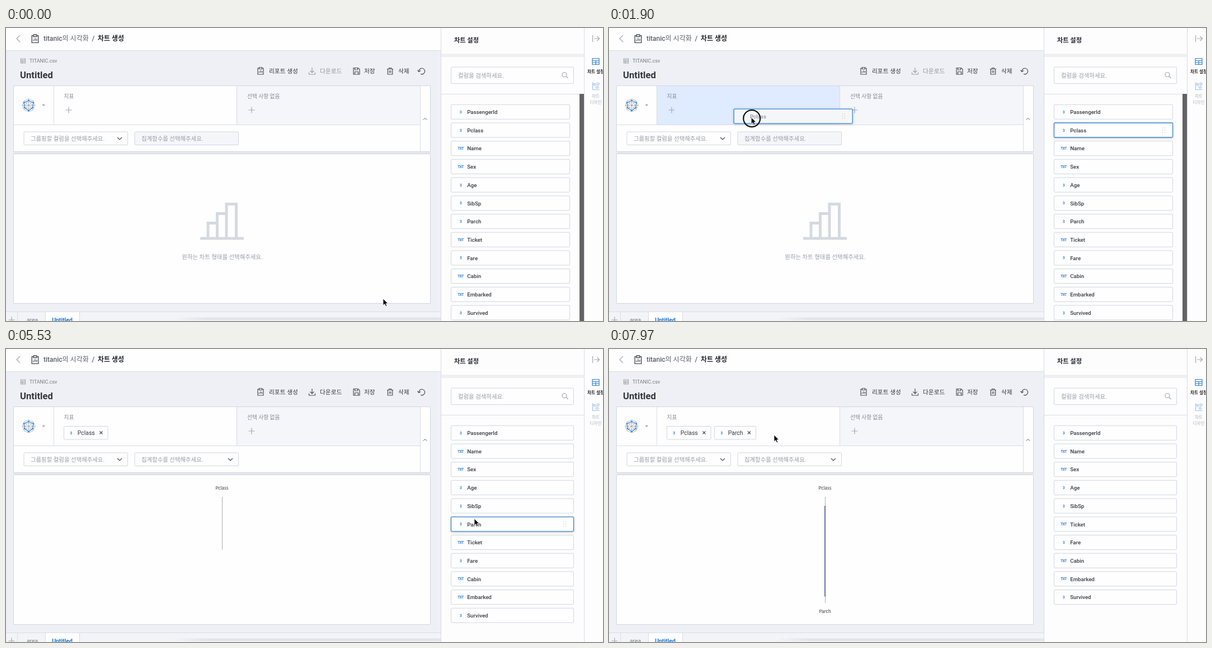
These frames come from a looping animation (1067 by 525 pixels, 8 s). An HTML page:

```html
<!DOCTYPE html>
<html lang="ko">
<head>
<meta charset="utf-8">
<title>차트 생성</title>
<style>
html, body { margin: 0; width: 100%; height: 100%; overflow: hidden; background: #fdfdfe; }
svg { display: block; width: 1067px; height: 525px; font: 10.4px Roboto, 'Noto Sans CJK KR', sans-serif; fill: #999da5; }
.line { fill: none; stroke: #d9dce3; }
.icon { fill: none; stroke: #4a4e57; stroke-width: 1.2; }
.muted { stroke: #a3a7af; }
.blue { stroke: #2f7fd0; }
.box { fill: #fefeff; stroke: #d2d6de; }
.off { fill: #f4f6fa; }
.bold { font-weight: 700; fill: #24272d; }
.tool { font-size: 10.7px; font-weight: 500; fill: #33363d; }
.head { font-size: 9.7px; font-weight: 500; fill: #858a93; }
.name { font-size: 9.7px; font-weight: 500; fill: #383b42; }
.type { font-size: 6.4px; font-weight: 700; fill: #2f7fd0; text-anchor: middle; letter-spacing: -.5px; }
.active { stroke: #3a86d0; stroke-width: 1.3; filter: drop-shadow(0 1px 2px #0003); }
.mid { text-anchor: middle; }
.tiny { font-size: 7.6px; text-anchor: middle; }
.axis { font: 8px 'Noto Sans CJK KR', sans-serif; text-anchor: middle; fill: #333; }
</style>
</head>
<body>
<svg viewBox="0 0 1067 525">
  <defs>
    <linearGradient id="fade">
      <stop offset="0" stop-color="#d8dae0" stop-opacity="0"/>
      <stop offset=".12" stop-color="#d8dae0" stop-opacity=".6"/>
      <stop offset="1" stop-color="#d8dae0" stop-opacity=".6"/>
    </linearGradient>
    <g id="clip" class="icon">
      <path d="M-2.5-5H-5V6H5V-5H2.5M-2.5-6.5h5v3h-5zM-2.5 3V1M0 3V-1M2.5 3V0"/>
    </g>
    <path id="cursor" d="M0 0V12L2.8 9.5 4.8 13.6 6.8 12.7 4.9 8.7H8.6Z" fill="#000" stroke="#fff" stroke-width=".8"/>
    <path id="plus" class="icon muted" d="M-5.5 0h11M0-5.5v11"/>
    <path id="chevron" class="icon" d="M-4-2 0 2 4-2"/>
  </defs>

  <path fill="#eef0f5" d="M0 40h777v485H0z"/>
  <path fill="#fefeff" d="M0 0h777v40H0z"/>
  <path class="line" d="M0 40.5h777"/>

  <path class="icon muted" d="M25 13l-6 6 6 6"/>
  <use href="#clip" transform="translate(52 19.5) scale(1.15)"/>
  <g font-size="12" font-weight="500" fill="#5b606a">
    <text x="67" y="23">titanic의 시각화</text>
    <text x="153.500" y="23">/</text>
  </g>
  <text class="bold" font-size="12" x="164" y="23">차트 생성</text>

  <path class="icon muted" stroke-width="1" d="M26.500 55h8v8h-8zM26.500 57.500h8M26.500 60.300h8M29.500 57.500V63"/>
  <text x="42" y="62" font-size="9" fill="#777c85">TITANIC.csv</text>
  <text class="bold" x="25" y="89.500" font-size="16.700" style="fill:#33363d">Untitled</text>

  <use href="#clip" x="455" y="77"/>
  <text class="tool" x="470" y="81">리포트 생성</text>
  <path class="icon" d="M621 71.500h8.500l2.500 2.500v9h-11zM623.500 71.500v3.500h5v-3.500M623.500 83v-4.500h6V83"/>
  <text class="tool" x="640" y="81">저장</text>
  <path class="icon" d="M681 73.500h11M684.500 73.500v-2h4v2M682.300 73.500V83h8.400v-9.500M685.300 76v4.500M687.700 76v4.500"/>
  <text class="tool" x="701" y="81">삭제</text>
  <path class="icon" d="M738 78a5.300 5.300 0 1 1 3 4.300M735.500 75.500l2.500 3 3-2.300"/>

  <path class="box" d="M13.500 103.500h745v118h-745z"/>
  <path class="off" d="M412 104h328v70H412z"/>
  <g id="panel"></g>
  <path class="line" d="M85.500 104v70M412.500 104v70M740.500 104v118M14 173.500h726"/>
  <path fill="#e6e8ed" d="M14 222h744v3H14z"/>
  <path class="box" d="M13.500 225.500h745v268h-745z"/>

  <g id="radar"></g>
  <path d="M64.500 137h5.500l-2.750 3z"/>
  <text class="head" x="103.500" y="125.500">지표</text>
  <text class="head" x="431" y="125.500">선택 사항 없음</text>
  <use href="#plus" x="439" y="147"/>
  <use href="#chevron" class="flip" transform="translate(749 163) scale(.8 -.8)"/>
  <rect class="box" x="32" y="186" width="185.500" height="23.500" rx="1.500"/>
  <text x="44" y="201.500">그룹핑할 컬럼을 선택해주세요.</text>
  <use href="#chevron" x="203" y="198"/>

  <path class="line" d="M0 508.500h777"/>
  <path fill="#f3f4f8" d="M0 509h777v16H0z"/>
  <path fill="url(#fade)" d="M300 518.500h477v5H300z"/>
  <path fill="#fefeff" d="M71 509h60v16H71z"/>
  <path class="line" d="M20.500 509v16M70.500 509v16M131.500 509v16"/>
  <use href="#plus" x="10" y="523"/>
  <text class="mid" x="47" y="526.500" fill="#777c85">area</text>
  <text class="bold mid" x="100.500" y="526.500" style="fill:#1f78d1">Untitled</text>

  <path fill="#fdfdfe" d="M777 0h290v525H777z"/>
  <path fill="#f0f0f3" d="M778 46h255v6H778z"/>
  <path class="line" d="M777.500 0v525M1033.500 0v525M778 118.500h255"/>
  <text class="bold" x="801" y="26" font-size="11.200">차트 설정</text>
  <rect class="box" x="795.500" y="70" width="219" height="29.500" rx="1.500"/>
  <text x="808" y="88.500">컬럼을 검색하세요.</text>
  <path class="icon muted" d="M1002 83.500a4 4 0 1 1-8 0 4 4 0 0 1 8 0M1001 86.500l3.500 3.500"/>
  <path class="icon muted" d="M1048.500 13v12M1051 19h9M1056.500 15l4 4-4 4"/>
  <path class="icon blue" d="M1048 54.500h12v11h-12zM1048 58.500h12M1048 62h12M1054 58.500v7"/>
  <text class="bold tiny" x="1054" y="81">차트 설정</text>
  <path class="icon blue" opacity=".45" d="M1048.500 97v13.500h12M1053.500 101a1.700 1.700 0 1 1-3.400 0 1.700 1.700 0 0 1 3.400 0M1060 100a2 2 0 1 1-4 0 2 2 0 0 1 4 0M1058.500 106a2 2 0 1 1-4 0 2 2 0 0 1 4 0"/>
  <text class="tiny" x="1054" y="125" fill="#b0b4bb">차트</text>
  <text class="tiny" x="1054" y="136" fill="#b0b4bb">디자인</text>

  <g id="scene"></g>
</svg>
<script>
const LOOP = 8000, ROW = 32.7, LIST_X = 795.5, LIST_Y = 137.3, CARD_H = 26;
const columns = ['PassengerId', 'Pclass', 'Name', 'Sex', 'Age', 'SibSp', 'Parch', 'Ticket', 'Fare', 'Cabin', 'Embarked', 'Survived'];
const textual = ['Name', 'Sex', 'Ticket', 'Cabin', 'Embarked'];
const drags = [
  { name: 'Pclass', press: 840, drop: 2530, grab: [31, 15] },
  { name: 'Parch', press: 5660, drop: 7130, grab: [31, 8] }
];
// time, x, y of the pointer tip
const path = [
  [0, 674, 485], [30, 674, 485], [780, 826, 185], [880, 826, 185], [1430, 314, 165],
  [2500, 168, 153], [2700, 164, 154], [2900, 164, 154], [3700, 806, 400], [4230, 828, 410],
  [4630, 828, 410], [5430, 838, 302], [5530, 837, 304], [5640, 826, 309], [5700, 826, 309],
  [6230, 317, 156], [7070, 297, 155], [7970, 295, 154], [LOOP, 295, 154]
];
const $ = id => document.getElementById(id);

function pointerAt(t) {
  const i = path.findIndex(p => p[0] > t);
  const [t0, x0, y0] = path[i - 1], [t1, x1, y1] = path[i];
  const u = (t - t0) / (t1 - t0), k = u * u * (3 - 2 * u);
  return [x0 + (x1 - x0) * k, y0 + (y1 - y0) * k];
}

const inside = ([px, py], x, y, w, h) => px >= x && px <= x + w && py >= y && py <= y + h;

function card(name, x, y, w, active, ghost) {
  let dots = '';
  if (active) for (let i = 0; i < 6; i++)
    dots += `<circle cx="${x + w - 18 + i % 2 * 4}" cy="${y + 9 + (i >> 1) * 4}" r=".8" fill="#c3c7cf"/>`;
  return `<rect class="box ${active ? 'active' : ''}" x="${x}" y="${y}" width="${w}" height="${CARD_H}" rx="1.5" ${ghost ? 'fill-opacity=".85"' : ''}/>
    <g opacity="${ghost ? .55 : 1}">
      <text class="type" x="${x + 17}" y="${y + 15.5}">${textual.includes(name) ? 'TXT' : '3'}</text>
      <text class="name" x="${x + 28.7}" y="${y + 16.7}">${name}</text>
    </g>${dots}`;
}

function chip(name, x, w, hover) {
  const c = x + w - 12;
  return `<rect class="box" x="${x}" y="138.500" width="${w}" height="23.500" rx="1.500" ${hover ? 'style="fill:#ececf1"' : ''}/>
    <text class="type" x="${x + 12.5}" y="152.500">3</text>
    <text x="${x + 24.3}" y="154" fill="#33363d">${name}</text>
    <path class="icon" d="M${c - 2.5} 147.500l5 5m0-5l-5 5"/>`;
}

function chart(t, count) {
  if (!count) return `<path fill="none" stroke="#d5d9e0" stroke-width="5"
      d="M347 377h78M361 376v-26.500h16.500M377.500 376v-43.500h16.500M394 376v-60.500h17.500v60.500"/>
    <text class="mid" x="386.500" y="414">원하는 차트 형태를 선택해주세요.</text>`;
  let out = `<path d="M386.500 265V${count > 1 ? 455 : 360}" stroke="#a9abb0"/><text class="axis" x="386" y="251.500">Pclass</text>`;
  if (count > 1) {
    const grow = 1 - (1 - Math.min(1, (t - drags[1].drop) / 800)) ** 3;
    out += `<path d="M386 ${360 - 79 * grow}V${360 + 83.5 * grow}" stroke="#4a508f" stroke-width="1.500"/>
      <text class="axis" x="386" y="472.500">Parch</text>`;
  }
  return out;
}

function render(t) {
  const pointer = pointerAt(t), [px, py] = pointer;
  const dropped = drags.filter(d => t >= d.drop).map(d => d.name);
  const drag = drags.find(d => t >= d.press && t < d.drop);
  const count = dropped.length, cardW = count ? 219 : 212;
  const over = drag && inside(pointer, 85, 104, 327, 70);
  $('panel').innerHTML = over ? '<path fill="#dfebfe" d="M86 104h326v70H86z"/>' : '';

  let out = chart(t, count);
  out += `<g opacity="${count ? 1 : .5}"><path class="icon" d="M547 71v8.500M543.500 76.500l3.500 3.500 3.500-3.500M541.500 79.500V83h11v-3.500"/>
    <text class="tool" x="561" y="81">다운로드</text></g>
    <rect class="box ${count ? '' : 'off'}" x="230" y="186" width="185.500" height="23.500" rx="1.500" ${count ? '' : 'style="fill:#f4f6fa"'}/>
    <text x="242" y="201.500">집계함수를 선택해주세요.</text>`;
  out += count ? '<use href="#chevron" x="401" y="198"/>' : '<use href="#plus" x="112" y="147"/><path fill="#636366" d="M1025 118h8v407h-8z"/>';
  if (count) out += chip('Pclass', 103.5, 78.5, !drag && inside(pointer, 103, 138, 79, 24));
  if (count > 1) out += chip('Parch', 188.5, 74, inside(pointer, 188, 138, 74, 24));

  columns.filter(name => !dropped.includes(name)).forEach((name, i) => {
    const y = LIST_Y + i * ROW;
    const active = drag ? drag.name === name : inside(pointer, LIST_X, y, cardW, CARD_H);
    out += card(name, LIST_X, y, cardW, active);
  });

  if (drag) out += card(drag.name, px - drag.grab[0], py - drag.grab[1], cardW, true, true);
  out += `<use href="#cursor" x="${px}" y="${py}"/>`;
  if (drag) out += `<circle cx="${px + 1}" cy="${py + 2}" r="15" fill="none" stroke="#111" stroke-width="2.200"/>`;
  $('scene').innerHTML = out;
}

function drawRadarIcon() {
  const ring = (n, radius) => Array.from({ length: n }, (_, i) => {
    const a = i / n * 2 * Math.PI - Math.PI / 2, r = radius(i);
    return [40.5 + r * Math.cos(a), 138.5 + r * Math.sin(a)];
  });
  const outer = ring(8, () => 11.5), inner = ring(6, i => 8.5 + i % 2);
  $('radar').innerHTML = `<g class="icon muted" style="stroke-width:.8"><polygon points="${outer}"/><polygon points="${ring(8, () => 6)}"/>
    <path d="${outer.map(p => `M40.500 138.500L${p}`).join('')}"/></g>
    <polygon class="icon blue" points="${inner}"/>` +
    inner.map(([x, y]) => `<circle cx="${x}" cy="${y}" r="1.300" fill="#2f7fd0"/>`).join('');
}

drawRadarIcon();
render(0);
let start;
requestAnimationFrame(function tick(now) {
  start ??= now;
  render((now - start) % LOOP);
  requestAnimationFrame(tick);
});
</script>
</body>
</html>
```
